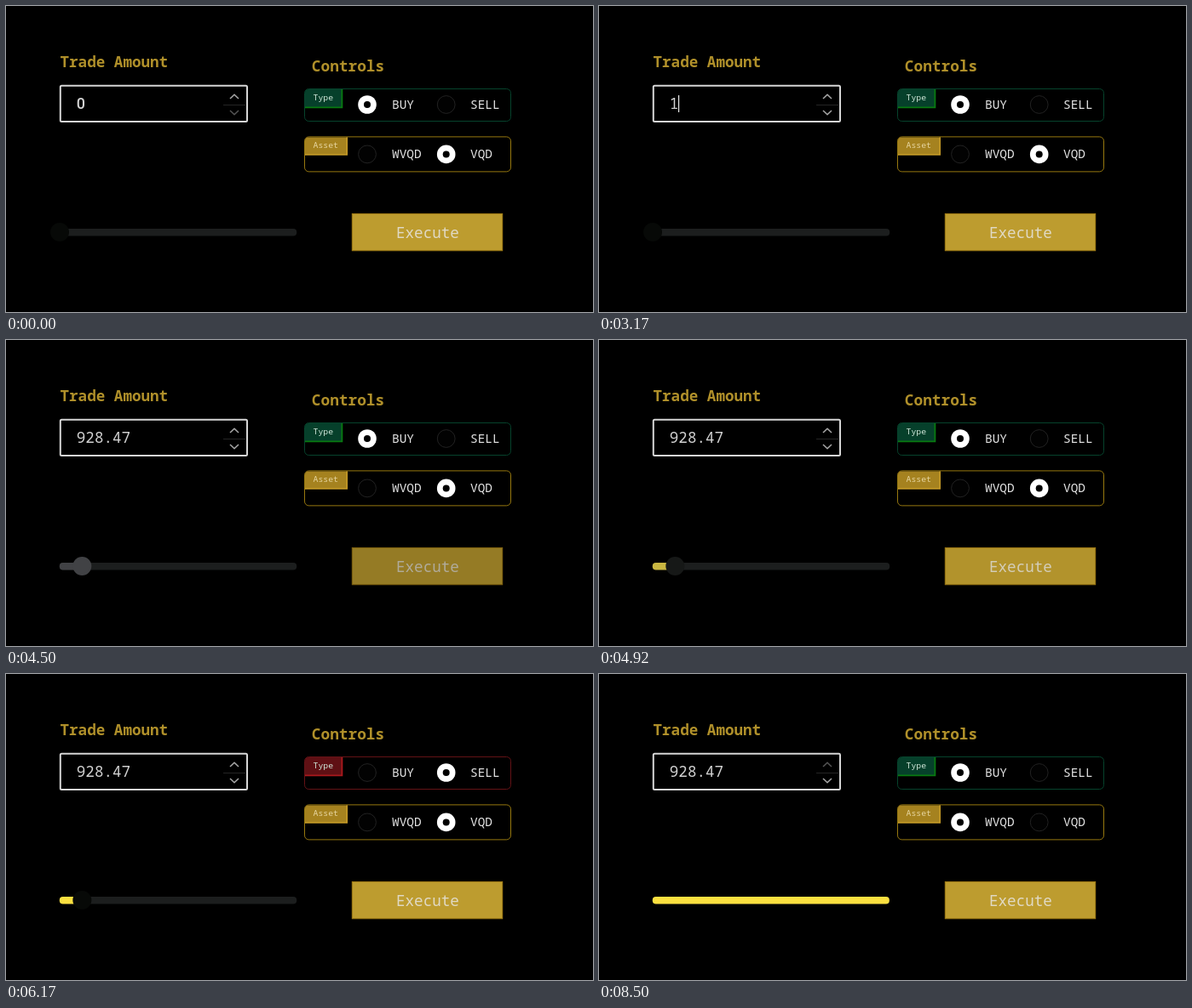
An HTML page for the animation above (10000 ms loop, 689 by 360 pixels).

```html
<!DOCTYPE html>
<html lang="en">
<head>
<meta charset="utf-8">
<title>Trade panel</title>
<style>
  html, body { margin: 0; width: 100%; height: 100%; overflow: hidden; background: #000; }
  svg { display: block; width: 689px; height: 360px; }
  text { font-family: "Noto Sans Mono", "DejaVu Sans Mono", monospace; font-size: 17.6px; font-weight: 500; white-space: pre; }
  .head { font-weight: 600; fill: #b0902a; }
  .label { font-size: 14.4px; fill: #e2e2e2; }
  .tag { font-size: 9.8px; }
  .value { fill: #d2d2d2; }
  .zero { font-family: Roboto, sans-serif; font-size: 18px; }
  .arrow { fill: none; stroke-width: 1.5; }
</style>
</head>
<body>
<svg viewBox="0 0 689 360">
  <rect width="689" height="360" fill="#000"/>

  <text class="head" x="63.5" y="71.7">Trade Amount</text>
  <rect x="63.8" y="93.8" width="219.2" height="42.2" rx="1.5" fill="none" stroke="#d6d6d6" stroke-width="2"/>
  <path d="M255 116.5H281" stroke="#242424"/>
  <path id="up" class="arrow" d="M263 109L268 104.2L273 109"/>
  <path id="down" class="arrow" d="M263 123L268 127.8L273 123"/>
  <rect id="selection" x="83" y="105" width="11.5" height="20" fill="#555"/>
  <text id="value" class="value" x="82.8" y="121"></text>
  <rect id="caret" x="93" y="105" width="1.2" height="20" fill="#e8e8e8"/>

  <text class="head" x="358.8" y="77" style="font-size:17.8px">Controls</text>
  <rect id="typeBox" x="350.5" y="97.5" width="242" height="38" rx="5" fill="none"/>
  <path id="typeTag" d="M351 120V102Q351 98 355 98H395V120Z"/>
  <path id="typeEdge" d="M351 119.4H394.4V98" fill="none" stroke-width="1.8"/>
  <text class="tag" x="360.5" y="111.3" fill="#cfe6d9">Type</text>
  <text class="label" x="453" y="121">BUY</text>
  <text class="label" x="545" y="121">SELL</text>

  <rect x="350.5" y="153.9" width="242" height="41" rx="5" fill="none" stroke="#98790f"/>
  <path d="M351 175.4V158Q351 154.4 355 154.4H401V175.4Z" fill="#a5821f"/>
  <path d="M351 174.7H400.2V154.4" fill="none" stroke="#c49a27" stroke-width="1.6"/>
  <text class="tag" x="360.5" y="166.8" fill="#e6d59f">Asset</text>
  <text class="label" x="453" y="179.3">WVQD</text>
  <text class="label" x="545" y="179.3">VQD</text>
  <g id="radios"></g>

  <rect x="62.8" y="262" width="278.4" height="8.6" rx="4" fill="#1c1e1e"/>
  <rect id="fill" x="62.8" y="262" height="8.6" rx="4"/>
  <circle id="thumb" cy="266" r="11"/>

  <g id="button">
    <rect x="406.3" y="244.4" width="176.4" height="43.4" fill="#bd9c2f" stroke="#a67f14"/>
    <text x="458" y="272.8" fill="#e0d9c4">Execute</text>
  </g>
</svg>
<script>
const RATE = 12, LOOP = 120;      // ticks per second, ticks per loop
const MAX = 9800, LEFT = 63, SPAN = 278;

// [tick, value] tables, linear between entries
const AMOUNT = [[22, 0], [23, 1], [40, 1], [46, 1842.16], [47, 1842.16],
  [48, 1877.35], [49, 1877.35], [53, 928.47]];
const BUSY = [[16, 0], [17, 1], [18, .15], [19, 0], [53, 0], [54, 1], [56, .7],
  [58, .35], [62, 0], [88, 0], [89, 1], [92, 0], [99, 0], [100, 1], [102, 0]];
const RED = [[71, 0], [74, 1], [84, 1], [86, 0]];

const GRAY = [65, 66, 69], YELLOW = [251, 224, 64], DARK = [7, 9, 7];

const $ = id => document.getElementById(id);
const within = (n, a, b) => n >= a && n < b;
const set = (id, attrs) => {
  for (const key in attrs) $(id).setAttribute(key, attrs[key]);
};
const show = (id, on) => set(id, { visibility: on ? "visible" : "hidden" });

function at(table, n) {
  if (n <= table[0][0]) return table[0][1];
  for (let i = 1; i < table.length; i++) {
    const [a, from] = table[i - 1], [b, to] = table[i];
    if (n <= b) return from + (to - from) * (n - a) / (b - a);
  }
  return table[table.length - 1][1];
}

function mix(a, b, k) {
  return `rgb(${a.map((v, i) => Math.round(v + (b[i] - v) * k))})`;
}

function radio(x, y) {
  const g = document.createElementNS("http://www.w3.org/2000/svg", "g");
  $("radios").append(g);
  return on => {
    g.innerHTML = on
      ? `<circle cx="${x}" cy="${y}" r="10.8" fill="#fff"/><circle cx="${x}" cy="${y}" r="4" fill="#000"/>`
      : `<circle cx="${x}" cy="${y}" r="10.4" fill="#020202" stroke="#222"/>`;
  };
}
const buy = radio(424, 116), sell = radio(516.7, 116);
const wrapped = radio(424, 174.4), plain = radio(516.7, 174.4);

function draw(n) {
  const amount = at(AMOUNT, n), busy = at(BUSY, n), red = at(RED, n);
  const full = n >= 100;
  const part = full ? 1 : amount / MAX;
  const selling = within(n, 72, 85);

  $("value").textContent = amount > 1 ? amount.toFixed(2) : amount;
  $("value").classList.toggle("zero", amount === 0);
  show("selection", within(n, 14, 23));
  show("caret", within(n, 23, 30) || within(n, 38, 41));
  set("up", { stroke: full ? "#555" : "#a8a8a8" });
  set("down", { stroke: amount > 0 ? "#a8a8a8" : "#555" });

  buy(!selling);
  sell(selling);
  wrapped(full);
  plain(!full);
  set("typeBox", { stroke: mix([6, 67, 44], [100, 18, 22], red) });
  set("typeTag", { fill: mix([6, 64, 43], [95, 16, 20], red) });
  set("typeEdge", { stroke: mix([8, 122, 16], [170, 24, 28], red) });

  set("fill", { width: SPAN * part, fill: mix(YELLOW, GRAY, busy) });
  set("thumb", { cx: LEFT + SPAN * part, fill: mix(DARK, GRAY, busy) });
  show("thumb", !full);
  set("button", { opacity: 1 - .21 * busy });
}

const start = performance.now();
let last = -1;
function frame(now) {
  const n = Math.floor(Math.max(0, now - start) * RATE / 1000 + .05) % LOOP;
  if (n !== last) draw(last = n);
  requestAnimationFrame(frame);
}
draw(0);
requestAnimationFrame(frame);
</script>
</body>
</html>
```
